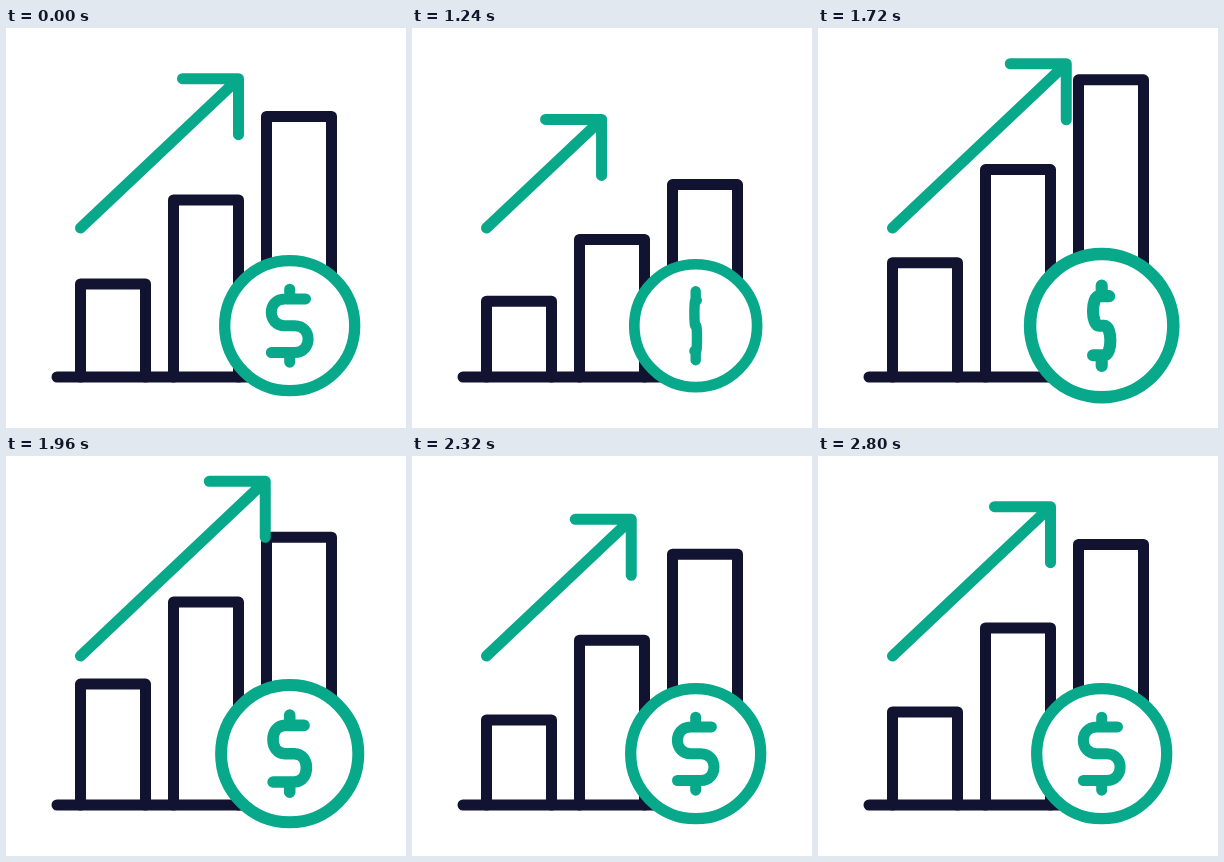
Animation, 400 px wide and 400 px high, one loop 2.83 s. Source, as an HTML page:

```html
<!DOCTYPE html>
<html lang="en">
<head>
<meta charset="utf-8">
<title>Growth chart</title>
<style>
  html, body { margin: 0; width: 100%; height: 100%; overflow: hidden; background: #fff; }
  svg { display: block; width: 100%; height: 100%; }
  path, circle { stroke-linecap: round; stroke-linejoin: round; stroke-width: 11; fill: none; }
  .navy { stroke: #121331; }
  .green { stroke: #08a88a; }
</style>
</head>
<body>
<svg viewBox="0 0 400 400">
  <path class="navy" d="M51 349H283"/>
  <path class="navy" id="bar1"/>
  <path class="navy" id="bar2"/>
  <path class="navy" id="bar3"/>
  <path class="green" id="arrow"/>
  <g id="coin">
    <circle class="green" r="65" style="fill:#fff;stroke-width:11.3"/>
    <path class="green" id="dollar"/>
  </g>
</svg>
<script>
const LOOP = 2830, START = 1000, STEP = 30;
const el = id => document.getElementById(id);

// Cubic bezier easing with control points (x1, 0) and (x2, 1).
function ease(u, x1, x2) {
  let lo = 0, hi = 1;
  for (let i = 0; i < 30; i++) {
    const s = (lo + hi) / 2, r = 1 - s;
    if (3 * x1 * s * r * r + 3 * x2 * s * s * r + s * s * s < u) lo = s; else hi = s;
  }
  return lo * lo * (3 - 2 * lo);
}

// Keys are [time, value, x1, x2]; the easing belongs to the leg that ends there.
function track(t, keys) {
  if (t <= keys[0][0]) return keys[0][1];
  for (let i = 1; i < keys.length; i++) {
    const [t0, v0] = keys[i - 1], [t1, v1, x1, x2] = keys[i];
    if (t < t1) return v0 + (v1 - v0) * ease((t - t0) / (t1 - t0), x1, x2);
  }
  return keys[keys.length - 1][1];
}

// Dip, overshoot, small dip, rest.
const bounce = (dipAt, dip, peakAt, peak, sagAt, sag) => [
  [START, 0],
  [dipAt, dip, .25, .4],
  [peakAt, peak, .25, 0],
  [sagAt, sag, .25, .25],
  [2800, 0, .25, .25]
];

const bars = [
  { node: el('bar1'), x: 74.5, top: 256, base: 349, keys: bounce(1450, 23, 2000, -28, 2450, 10.3) },
  { node: el('bar2'), x: 167.5, top: 172, base: 349, keys: bounce(1375, 46, 1885, -34, 2340, 12.2) },
  { node: el('bar3'), x: 260.5, top: 88.5, base: 300, keys: bounce(1300, 71, 1790, -37.5, 2240, 11.2) }
];
const arrowKeys = bounce(1450, 54.6, 2000, -25.5, 2450, 15);
const coinKeys = [[START, 1], [1450, .9, 1 / 3, 2 / 3], [1690, 1.103, 1 / 3, 2 / 3], [2260, 1, 1 / 3, 2 / 3]];
const spinKeys = [[START, 0], [2680, 2 * Math.PI, .25, 0]];

// Only the outline is narrowed by the spin, the stroke keeps its weight.
function dollarPath(c) {
  const p = (x, y) => `${(x * c).toFixed(3)} ${y} `;
  return `M0 -36.5V-26.8M0 26.8V36.5M${p(15.8, -26.8)}L${p(-5, -26.8)}` +
    `C${p(-22.9, -26.8)}${p(-22.9, 0)}${p(-5, 0)}L${p(5, 0)}` +
    `C${p(22.9, 0)}${p(22.9, 26.8)}${p(5, 26.8)}L${p(-18.3, 26.8)}`;
}

function draw(t) {
  for (const { node, x, top, base, keys } of bars) {
    node.setAttribute('d', `M${x} ${base}V${top + track(t, keys)}H${x + 65}V${base}`);
  }
  const shift = track(t, arrowKeys);
  const x = 232.5 - shift * 1.055, y = 50.7 + shift;
  el('arrow').setAttribute('d', `M74.5 200L${x} ${y}M${x - 56} ${y}H${x}V${y + 56}`);
  el('coin').setAttribute('transform', `translate(283.7 297.7) scale(${track(t, coinKeys)})`);
  el('dollar').setAttribute('d', dollarPath(Math.cos(track(t, spinKeys))));
}

const origin = performance.now();
function tick() {
  const t = Math.max(0, performance.now() - origin) % LOOP;
  draw(START + Math.floor((t - START) / STEP) * STEP);
  requestAnimationFrame(tick);
}
tick();
</script>
</body>
</html>
```
